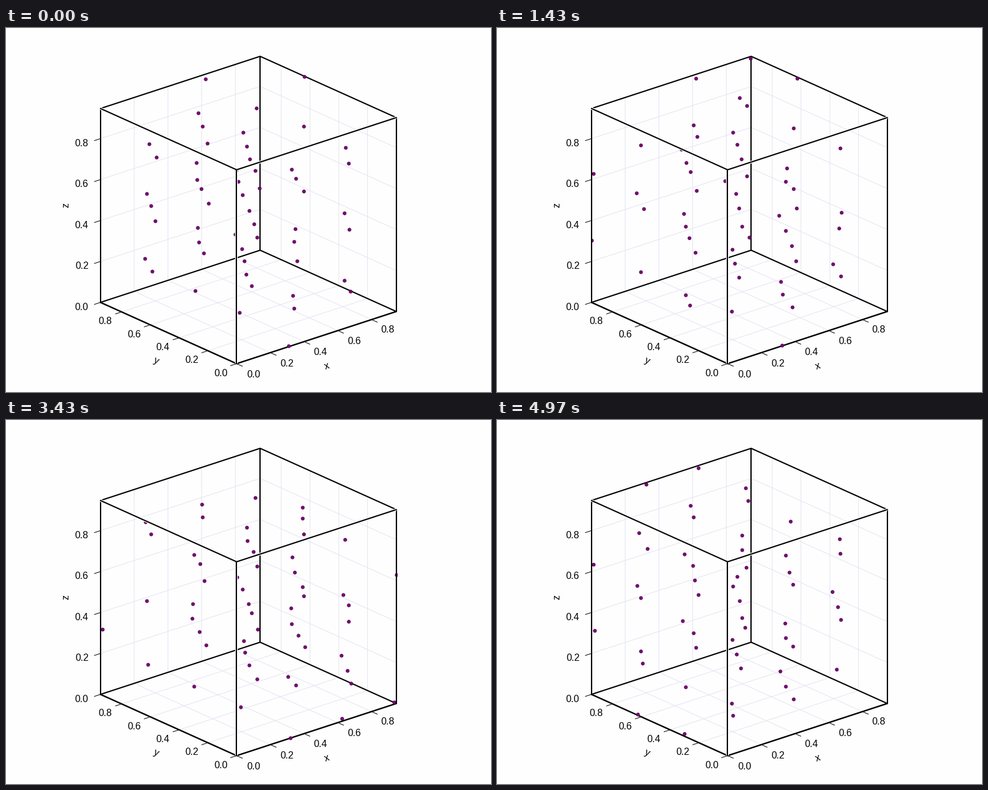
Write a matplotlib script that moves like this. It is 800 px wide and 600 px high and loops after 5.01 s.

```python
import numpy as np
import matplotlib.pyplot as plt
from matplotlib.animation import FuncAnimation
from matplotlib.patches import Rectangle

W, H, DPI = 800, 600, 100
PX = 72 / DPI
FRAMES, LOOP = 150, 5010
BOX = 0.947                      # side length in axis units
CELLS = 3                        # lattice cells per side
ORIGIN = np.array([380.4, 553.3])
AXES = np.array([[263.4, -86], [-224.6, -101], [0, -319.6]])
BACK, INK, GRID = "#fefefe", "#000000", "#e4e4f2"


def project(p):
    return ORIGIN + np.asarray(p) @ AXES


# Body-centred cubic lattice; each particle swings about its site
rng = np.random.default_rng(7)
corners = np.stack(np.meshgrid(*[np.arange(CELLS)] * 3), -1).reshape(-1, 3)
sites = np.vstack([corners, corners + 0.5]) / CELLS
swing_a, swing_b = rng.normal(0, 0.0095, (2, *sites.shape))
rate = 2 * np.pi * rng.uniform(5, 13, sites.shape) / FRAMES


def particles(n):
    pos = sites + swing_a * np.cos(rate * n) + swing_b * np.sin(rate * n)
    return project(pos % 1).T    # periodic walls


fig = plt.figure(figsize=(W / DPI, H / DPI), dpi=DPI, facecolor=BACK)
ax = fig.add_axes([0, 0, 1, 1])
ax.set_xlim(0, W)
ax.set_ylim(H, 0)
ax.axis("off")


def line(points, color=INK, width=2.1, z=2):
    ax.plot(*project(points).T, color=color, lw=width * PX, zorder=z,
            solid_capstyle="butt" if z > 4 else "round")


def label(x, y, text, angle=0, va="center"):
    ax.text(x, y, text, family="Liberation Sans", fontsize=16 * PX, color=INK,
            ha="center", va=va, rotation=angle, zorder=3)


def number(x, y, value):
    label(x, y + 6, f"{value:.1f}", va="baseline")


def tick(start, step):
    x, y = project(start)
    ax.plot([x, x + step[0]], [y, y + step[1]], color=INK, lw=PX, zorder=2)


for i in range(5):
    value = 0.2 * i
    t = value / BOX
    if i:
        line([(t, 0, 0), (t, 1, 0), (t, 1, 1)], GRID, 1, 1)
        line([(0, t, 0), (1, t, 0), (1, t, 1)], GRID, 1, 1)
        line([(0, 1, t), (1, 1, t), (1, 0, t)], GRID, 1, 1)
    tick((t, 0, 0), (9.5, 4.2))
    tick((0, t, 0), (-10, 3.3))
    tick((0, 1, t), (-10, 3.3))
    number(408 + 55.5 * i, 570 - 18.4 * i, value)
    number(354 - 47.5 * i, 567.5 - 21.3 * i, value)
    number(125, 459 - 67.6 * i, value)

label(529, 557, "x", 18)
label(248, 549, "y", -24)
label(99, 292, "z", 90)

# Rear and floor edges, then outer uprights, then the cased near corner
line([(0, 1, 0), (1, 1, 0), (1, 0, 0)])
line([(0, 1, 1), (1, 1, 1), (1, 0, 1)])
line([(1, 1, 0), (1, 1, 1)])
line([(0, 1, 0), (0, 0, 0), (1, 0, 0)], width=2.4)
for foot in ((0, 1), (1, 0)):
    line([(*foot, 0), (*foot, 1)], z=5)
near_edges = [[(0, 0, 1), end] for end in ((0, 1, 1), (1, 0, 1), (0, 0, 0))]
for edge in near_edges:
    line(edge, BACK, 4.4, 6)
for edge in near_edges:
    line(edge, z=7)

dots, = ax.plot([], [], "o", ms=5.2 * PX, mfc="#800078", mec="#4c0050",
                mew=0.9 * PX, zorder=4)
dots.set_clip_path(Rectangle((155, 46), 490, 508, transform=ax.transData))


def update(n):
    dots.set_data(*particles(n))
    return dots,


anim = FuncAnimation(fig, update, frames=FRAMES, interval=LOOP / FRAMES,
                     repeat=True, repeat_delay=0)
plt.show()
```
